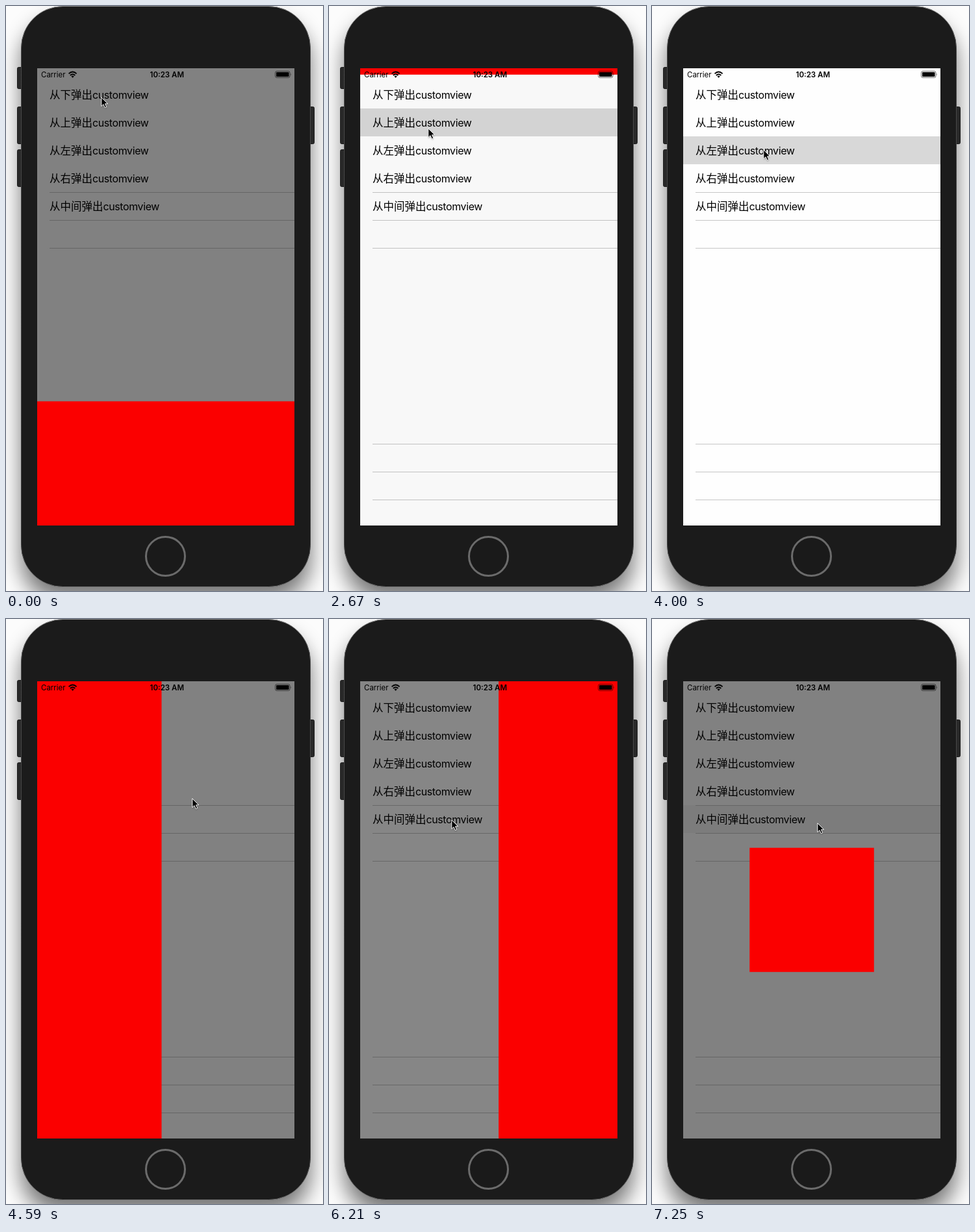
These frames come from a looping animation (488x902 px, 7990 ms). An HTML page:

```html
<!DOCTYPE html>
<html lang="zh-CN">
<head>
<meta charset="utf-8">
<title>Popup demo</title>
<style>
html, body { margin: 0; width: 100%; height: 100%; overflow: hidden; background: #fcfcfc; }
svg { display: block; width: 488px; height: 902px; }
.cjk { font: 16.5px "Noto Sans CJK SC", "Noto Sans CJK", "Noto Sans", sans-serif; }
.latin { font: 16px Inter, "Open Sans", sans-serif; letter-spacing: -0.4px; }
.status { font: 11.5px Inter, "Open Sans", sans-serif; }
.bold { font-weight: 600; }
</style>
</head>
<body>
<svg viewBox="0 0 488 902" xmlns="http://www.w3.org/2000/svg">
  <defs>
    <filter id="soft" x="-20%" y="-20%" width="140%" height="140%">
      <feGaussianBlur stdDeviation="16"/>
    </filter>
    <filter id="tiny" x="-50%" y="-50%" width="200%" height="200%">
      <feGaussianBlur stdDeviation="0.8"/>
    </filter>
    <linearGradient id="rim" x1="0" y1="0" x2="0" y2="1">
      <stop offset="0" stop-color="#8a8a8a"/>
      <stop offset="0.08" stop-color="#4a4a4a"/>
      <stop offset="0.92" stop-color="#3c3c3c"/>
      <stop offset="1" stop-color="#707070"/>
    </linearGradient>
    <clipPath id="screen"><rect x="48" y="96" width="396" height="705"/></clipPath>
  </defs>

  <rect width="488" height="902" fill="#fcfcfc"/>
  <rect x="23" y="22" width="446" height="896" rx="64" opacity="0.52" filter="url(#soft)"/>
  <g fill="#292929" stroke="#1a1a1a">
    <rect x="17.5" y="94.5" width="9" height="33" rx="2"/>
    <rect x="17.5" y="155.5" width="9" height="57" rx="2"/>
    <rect x="17.5" y="221.5" width="9" height="57" rx="2"/>
    <rect x="465.5" y="155.5" width="9" height="57" rx="2"/>
  </g>
  <rect x="23.5" y="0.5" width="445" height="895" rx="64" fill="#1b1b1b" stroke="url(#rim)"/>
  <circle cx="245.5" cy="848.5" r="30" fill="#1a1a1a" stroke="#6b6b6b" stroke-width="3"/>

  <g clip-path="url(#screen)">
    <rect x="48" y="96" width="396" height="705" fill="#fefefe"/>
    <rect id="glow" x="48" width="396" height="43" fill="#d8d8d8"/>
    <g id="list"></g>
    <rect id="dim" x="48" y="96" width="396" height="705"/>
    <rect id="pop" fill="#fb0000"/>
    <text class="status" x="54" y="110">Carrier</text>
    <g fill="none" stroke="#000" stroke-width="2">
      <path d="M96.6 104.4 Q102.6 98.6 108.6 104.4"/>
      <path d="M98.9 107 Q102.6 103.4 106.3 107"/>
    </g>
    <path d="M100.5 108.4 Q102.6 106.6 104.7 108.4 L102.6 110.7Z"/>
    <text class="status bold" x="247.8" y="110" text-anchor="middle">10:23 AM</text>
    <rect x="414.5" y="100.5" width="22.5" height="10" rx="2.5" fill="none" stroke="#000" stroke-opacity="0.55"/>
    <rect x="416" y="102" width="19.5" height="7" rx="1"/>
    <path d="M438 103.8 q1.6 1.7 0 3.4z" opacity="0.55"/>
  </g>

  <g id="cursor">
    <path d="M1 2 V16 L4.2 13 L6.5 18 L8.8 17 L6.6 12.2 H11Z" opacity="0.4" filter="url(#tiny)"/>
    <path d="M0.8 0.8 V14.6 L4 11.7 L6.3 16.8 L8.7 15.7 L6.5 10.8 H10.7Z" stroke="#fff" stroke-width="1"/>
  </g>
</svg>
<script>
const LOOP = 7990, STEP = 148, SLIDE = 300, FADE = 335;
const SCREEN = { x: 48, y: 96, w: 396, h: 705 }, SIZE = 191.5;

const $ = id => document.getElementById(id);
const clamp = v => Math.min(1, Math.max(0, v));
const ease = v => { v = clamp(v); return v < 0.5 ? 2 * v * v : 1 - 2 * (1 - v) ** 2; };
const set = (el, attrs) => { for (const k in attrs) el.setAttribute(k, attrs[k]); };

// Pop-ups: side, touched row and its touch time, start of entrance and exit
const popups = [
  { side: 'bottom', row: 0, touch: -2000, in: -2000, out: 1730 },
  { side: 'top', row: 1, touch: 2600, in: 2616, out: 3215 },
  { side: 'left', row: 2, touch: 3980, in: 4040, out: 4730 },
  { side: 'right', row: 3, touch: 5320, in: 5380, out: 6171 },
  { side: 'center', row: 4, touch: 6940, in: 6950, out: 9000 }
];

// Pointer stops: step, x, y
const stops = [
  [0, 146, 140], [1, 158, 166], [2, 176, 207], [3, 188, 231], [4, 188, 231],
  [6, 231, 400], [7, 231, 400], [8, 213, 452], [9, 192, 492], [10, 218, 510],
  [12, 218, 510], [14, 190, 330], [16, 152, 188], [18, 152, 188], [19, 155, 200],
  [21, 205, 400], [23, 200, 420], [25, 172, 235], [26, 171, 221], [28, 171, 221],
  [31, 286, 276], [34, 286, 276], [36, 190, 262], [38, 190, 262], [40, 195, 300],
  [42, 188, 309], [44, 215, 318], [46, 254, 314], [60, 254, 314]
];

function buildList() {
  const labels = ['从下弹出', '从上弹出', '从左弹出', '从右弹出', '从中间弹出'];
  const rows = labels.map((label, i) => {
    const y = 143 + 43 * i;
    return `<text class="cjk" x="67" y="${y}">${label}</text>` +
      `<text class="latin" x="${67 + 16.5 * label.length}" y="${y}">customview</text>`;
  });
  const lines = [287, 330, 373, 675, 718, 761].map(y =>
    `<rect x="67" y="${y}" width="377" height="1" fill="#c6c6c6"/>`);
  $('list').innerHTML = lines.join('') + rows.join('');
}

function popBox(side, p) {
  const { x, y, w, h } = SCREEN, d = SIZE * p;
  switch (side) {
    case 'bottom': return { x, y: y + h - d, width: w, height: SIZE };
    case 'top': return { x, y: y + d - SIZE, width: w, height: SIZE };
    case 'left': return { x: x + d - SIZE, y, width: SIZE, height: h };
    case 'right': return { x: x + w - d, y, width: SIZE, height: h };
    default: return { x: x + (w - d) / 2, y: y + (h - d) / 2, width: d, height: d };
  }
}

function pointerAt(n) {
  const i = stops.findIndex(s => s[0] > n);
  const [n0, x0, y0] = stops[i - 1], [n1, x1, y1] = stops[i];
  const k = (n - n0) / (n1 - n0);
  return [x0 + (x1 - x0) * k, y0 + (y1 - y0) * k].map(Math.round);
}

function draw(ms) {
  const n = Math.floor((ms + 9) / (STEP + 0.05)), t = n * STEP;
  const cur = popups.filter(p => p.touch <= t).pop();
  const shown = ease((t - cur.in) / SLIDE) - ease((t - cur.out) / SLIDE);
  const glow = 1 - clamp((t - cur.in - 50) / FADE);

  set($('glow'), { y: 115 + 43 * cur.row, opacity: glow });
  set($('dim'), { opacity: 0.495 * shown });
  set($('pop'), popBox(cur.side, shown));
  $('pop').setAttribute('visibility', shown > 0.001 ? 'visible' : 'hidden');
  set($('cursor'), { transform: `translate(${pointerAt(n)})` });
}

buildList();
const start = performance.now();
function tick() {
  draw((performance.now() - start) % LOOP);
  requestAnimationFrame(tick);
}
tick();
</script>
</body>
</html>
```
